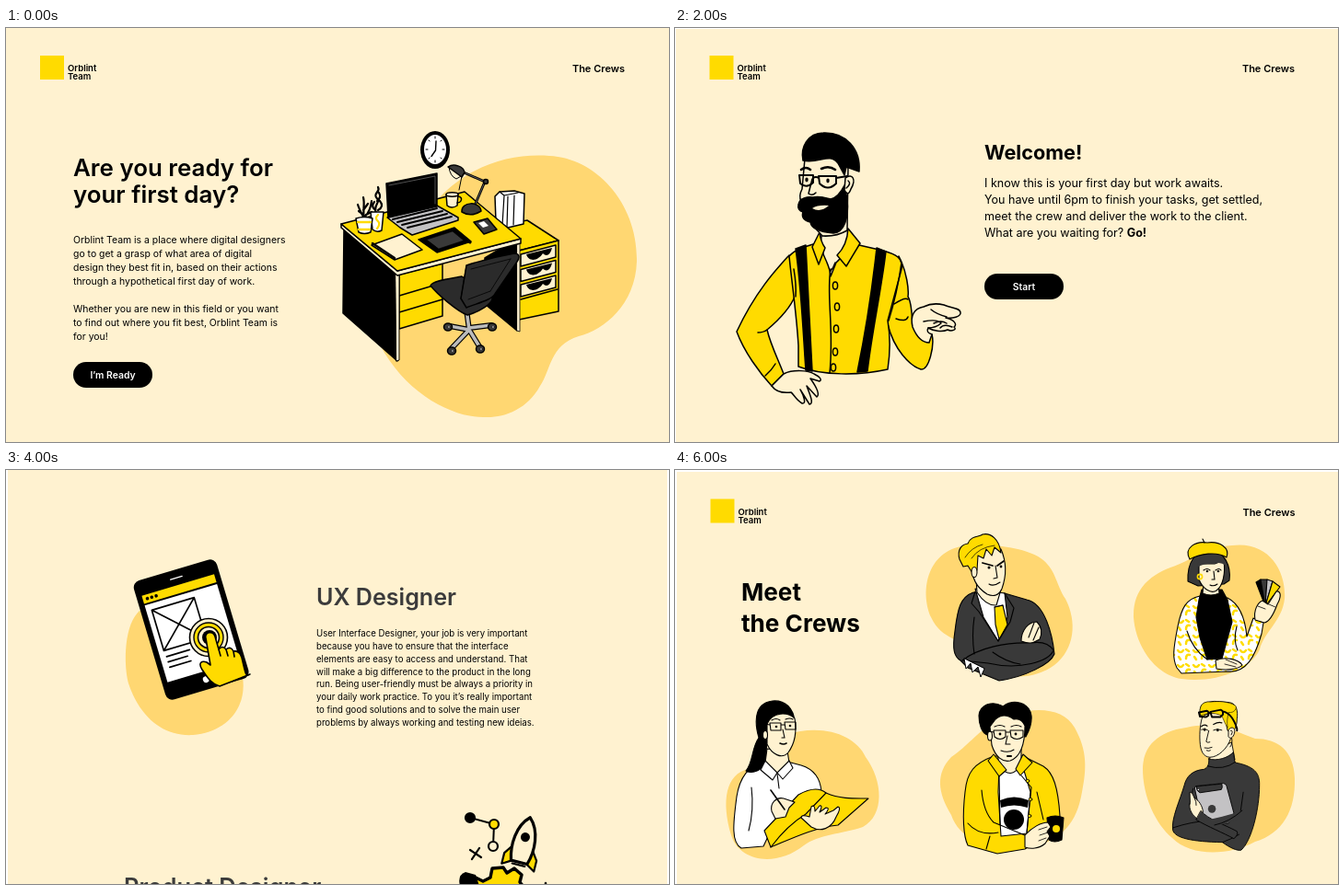
Recreate the animation shown at these times as an HTML page. Size 720 px wide and 450 px high, loop 7 s.

```html
<!DOCTYPE html>
<html lang="en">
<head>
<meta charset="utf-8">
<title>Crew quiz</title>
<style>
html, body { margin: 0; width: 100%; height: 100%; overflow: hidden; background: #fff; }
svg { display: block; width: 720px; height: 450px; }
text { font-family: Inter, "Open Sans", sans-serif; stroke: none; white-space: pre; }
.card { filter: drop-shadow(2.5px 2.5px 1.2px rgba(70, 60, 30, .45)); }
</style>
</head>
<body>
<svg id="stage" viewBox="0 0 720 450" stroke-linecap="round" stroke-linejoin="round">
<defs>
<pattern id="beans" width="17" height="16" patternUnits="userSpaceOnUse">
<rect width="17" height="16" fill="#fff"/>
<path d="M2 4q3 4 6 0M11 13q0-5 4-4M11 3l3 2M3 11l2 3" fill="none" stroke="#fd0" stroke-width="2.5"/>
</pattern>
</defs>
</svg>
<script>
const C = { y: '#ffdb00', k: '#000', w: '#fff', c: '#fff2d0', b: '#ffd772', d: '#393939',
  h: '#2b2b2b', g: '#c3c2c4', n: 'none', beans: 'url(#beans)' };

// Shape helpers: fill key, geometry, line weight (omitted = inherited)
const sw = w => w === undefined ? '' : w ? ` stroke-width="${w}"` : ' stroke="none"';
const p = (f, d, w) => `<path fill="${C[f]}" d="${d}"${sw(w)}/>`;
const l = (d, w) => p('n', d, w);
const e = (f, x, y, rx, ry, w) => `<ellipse fill="${C[f]}" cx="${x}" cy="${y}" rx="${rx}" ry="${ry}"${sw(w)}/>`;
const o = (f, x, y, r, w) => e(f, x, y, r, r, w);
const r = (f, x, y, w, h, rx, line) => `<rect fill="${C[f]}" x="${x}" y="${y}" width="${w}" height="${h}" rx="${rx}"${sw(line)}/>`;
const blob = d => p('b', d, 0);
const g = (attr, ...parts) => `<g ${attr}>${parts.join('')}</g>`;
const ink = (w, ...parts) => g(`stroke="#000" stroke-width="${w}"`, ...parts);
const tint = (color, ...parts) => g(`stroke="${color}"`, ...parts);

const text = (x, y, size, weight, str, lead = 0, anchor = 'start', color = '#000') =>
  `<text font-size="${size}" font-weight="${weight}" text-anchor="${anchor}" fill="${color}">` +
  str.split('|').map((s, i) => `<tspan x="${x}" y="${y + i * lead}">${s}</tspan>`).join('') + '</text>';

const page = (x, y, x2) => r('c', x, y, x2 - x, 450 - y, 0, 0);
const nav = (x, y, right) => r('y', x, y, 26, 26, 0, 0) +
  text(x + 30, y + 17, 9.5, 600, 'Orblint|Team', 9.3) +
  text(right, y + 18, 11, 600, 'The Crews', 0, 'end');
const button = (x, y, w, h, str, f = 'k', color = '#fff', size = 10.4) =>
  r(f, x, y, w, h, h / 2, 0) + text(x + w / 2, y + h / 2 + 3.7, size, 600, str, 0, 'middle', color);
const card = (x, y, tx, ty, str, f = 'w') =>
  g('class="card"', r(f, x, y, 158.5, 85, 23, 0)) + text(tx, ty, 9.6, 400, str, 13.6, 'middle');

const chairLegs = 'M500 306L503 328M503 328L484 348M503 328L514 346M503 328L482 324M503 326L527 323';
const desk = () => blob('M590 139C640 141 686 190 685 253C684 300 650 328 622 335C590 345 592 372 580 389C566 415 540 424 520 423C486 424 434 398 406 344C400 290 440 220 470 185C505 148 550 136 590 139Z') +
  ink(1.5,
    // clock
    e('k', 466, 132.5, 16, 20.5, 0), e('w', 466, 132, 12, 16, 0),
    l('M467 123L466.5 133L462 139.5', 1.4), l('M466 118v2M466 144v2M456 132h2M474 132h2M459 122l1 1M473 122l-1 1M459 142l1-1M473 142l-1-1', 1),
    // cabinet and papers
    p('y', 'M529 216L566 209L600 231L557 242Z'), p('y', 'M557 242L600 231V308L557 317Z'),
    [0, 16.5, 33].map(y => g(`transform="translate(0 ${y})"`, p('c', 'M559 246L597 236V249L559 259Z'),
      p('k', 'M565 246L593 239C591 247 587 249 583 245C578 253 568 255 565 246Z', 0))).join(''),
    l('M559 295L599 284'),
    p('w', 'M531 183L536 178L552 177L563 180L562 213L545 217L532 211Z'), l('M536 178L541 182L539 214M541 182L556 179M545 183L544 216M552 182L551 214', 1.2),
    // desk body
    p('k', 'M556 234L535 241L520 250V300L555 329Z'), p('c', 'M555 234L558 233V330L555 329Z', .8),
    p('y', 'M427 268L474 256V313L427 327Z'), l('M427 291L474 277M427 309L474 295'),
    p('k', 'M367 217L425 266V362L366 310Z'), p('c', 'M423 267L427 267V361L424 362Z', 1),
    p('c', 'M364 213L425 264L559 229V234L425 269L364 217Z'),
    p('y', 'M364 213L498 178L559 229L425 264Z'),
    // things on top
    p('c', 'M397 236L430 224L452 241L422 252Z'), l('M398 234l24 16', 2.4),
    p('k', 'M448 230L487 217L505 232L468 244Z'), p('d', 'M457 230L485 221L497 231L470 240Z', .6), l('M487 219l17 14', 3),
    p('d', 'M508 211L523 207L533 219L519 224Z'), p('w', 'M513 212l6-2l5 5l-6 2Z', 0),
    p('g', 'M414 206L468 193L491 206V209L441 225L428 217Z'), l('M420 208L468 196M425 211L474 199M430 214L479 202M436 217L484 205', 1.9),
    p('k', 'M413 169L468 158V194L415 206Z'), tint('#888', l('M416 171L466 161V191', .6)),
    p('c', 'M478 181L491 180L490 193Q484 197 479 193Z'), e('c', 484.5, 181, 6.5, 2.2), l('M491 183q5 1 3 5q-1 2-4 2'),
    // lamp
    l('M497 157L520 167L509 193', 2.8), tint('#888', l('M497 157L520 167L509 193', .7)),
    l('M495 161L492 176', 1), p('c', 'M481 151L496 160L489 164Q482 161 481 151Z', 1),
    p('d', 'M480 151C486 147 497 150 498 157L495 162Z'), o('d', 521, 167, 2.5), p('d', 'M495 200C494 188 515 188 516 199Q505 206 495 200Z'),
    // plants
    l('M389 207C387 198 390 192 388 184M389 207Q384 198 382 192M390 205Q396 198 397 188M388 198l5-7M387 202l-4-3M391 203l6-3M402 201C398 192 408 190 402 184C399 179 407 178 404 173M401 198q-5-4-1-9M404 198q7-4 2-10M403 188q5-4 2-9', 2.2),
    p('w', 'M396 200H410L408 220Q403 223 398 219Z'), tint(C.y, l('M404 203q-4 4 0 7q3 3-1 8', 2.2)),
    p('w', 'M380 207Q389 204 398 207L396 222Q389 225 383 222Z'), tint(C.y, l('M382 211H396M383 219H395', 2.4)),
    // chair
    l(chairLegs, 6), tint('#bbb', l(chairLegs, 3.6)),
    [[484, 351], [515, 349], [480, 325], [528, 325]].map(([x, y]) => e('d', x, y, 4.5, 4) + o('g', x + 1, y, 1.4, .6)).join(''),
    p('h', 'M461 280C463 274 486 272 495 270L528 292C530 300 512 309 501 312C490 308 468 289 461 280Z'),
    p('h', 'M500 258C515 253 535 248 552 245C558 245 558 250 555 254L531 289C527 296 512 299 500 304L494 294Z'),
    l('M505 262L548 251M502 295L526 286M500 258L494 294M548 251L526 286', .8));

const bearded = () => ink(1.5,
  p('y', 'M124 247C112 260 88 285 67 330C75 352 92 375 105 389L118 376C112 360 104 345 100 328C112 318 125 305 131 290Z'),
  p('y', 'M243 248C252 265 254 285 253 292C258 300 257 318 258 322C262 330 272 335 279 333C282 345 276 372 267 371C255 367 238 350 231 322L228 262Z'),
  p('y', 'M153 234C140 238 130 241 124 248C126 270 132 310 134 345V368C160 378 200 378 231 371C235 345 233 330 231 318L246 262C248 250 240 246 226 242L200 236L185 222Z'),
  l('M90 331Q96 331 100 328M109 365Q105 372 98 378M129 262Q132 280 131 292M246 255Q241 290 232 318M238 300Q250 292 253 295M240 316Q251 320 253 314'),
  p('k', 'M131 240L142 236C144 280 147 330 149 373L142 372C139 330 137 280 131 240Z'),
  p('k', 'M219 239L229 243C224 285 214 330 209 373L198 374C207 330 214 285 219 239Z'),
  p('c', 'M160 220L158 234C160 250 168 255 169 270L175 255C184 247 190 235 187 218Z'),
  p('y', 'M157 222L149 238L156 257L163 239Q158 232 157 222Z'), p('y', 'M188 218L201 234L186 259L176 247Q187 236 188 218Z'),
  l('M169 262C164 290 173 325 168 375'),
  [[174, 280], [176, 303], [175, 327], [174, 352], [172, 369]].map(([x, y]) => e('y', x, y, 2.6, 4)).join(''), l('M174 255q-2 6-5 9'),
  // hands
  p('c', 'M105 389L118 376C128 371 145 372 151 376C157 379 160 382 157 384L147 381C152 388 158 398 154 401L143 389C147 400 151 408 146 409L136 393C140 400 143 409 138 408C132 405 128 397 126 396C118 397 110 396 105 389Z'),
  p('c', 'M258 325C255 312 260 305 270 303C278 299 284 299 292 301C301 305 309 304 310 309C311 314 301 316 294 315C303 317 307 322 303 325C307 328 300 330 296 328C290 331 280 329 275 326Q272 331 279 333L276 342Q265 342 258 325Z'),
  l('M278 306Q284 311 295 314M270 319Q285 316 289 321Q283 326 275 326M281 321q8-4 14 0M288 326q4-5 13-1'),
  // head
  p('c', 'M141 142L138 175Q134 183 137 188L150 215L160 226Q175 227 187 220L188 150L170 136Z'),
  p('k', 'M134 192C135 185 144 183 150 184C157 182 165 185 169 186C177 184 181 177 184 171L187 186C189 206 184 222 172 223C158 222 148 218 147 211C140 209 137 206 139 200C135 199 133 196 134 192Z'),
  p('c', 'M149 196Q155 192 167 193Q158 201 149 196Z', 0), l('M149 164L145 180Q149 183 153 179'),
  p('k', 'M139 144C136 130 144 114 161 114C185 113 202 131 200 156L186 151L184 160L177 147C168 135 156 148 139 144Z'),
  p('c', 'M185 163C193 157 197 165 191 175Q188 184 184 176Z'), l('M188 166q4 3-2 8'),
  l('M137 154Q142 150 147 154M159 153Q167 149 174 154', 2.6), e('k', 143, 165, 1.7, 2.4, 0), e('k', 166, 166, 1.7, 2.4, 0),
  l('M135 160H150V168Q143 175 136 169ZM156 161H175V169Q166 178 157 169ZM150 163Q153 161 156 163M175 163L187 161', 2));

const tabletMan = () => ink(1.6,
  p('c', 'M555 212L553 235Q580 245 602 228L596 195Z'),
  p('y', 'M537 145C531 125 540 117 552 117C565 114 580 117 592 118C606 120 608 136 606 150C606 160 603 170 596 176L582 178Z'),
  p('c', 'M540 145C536 155 534 175 535 192C536 212 542 222 554 223C570 223 588 206 594 187L594 172L588 172L583 148L572 140Q555 134 540 145Z'),
  p('y', 'M536 143C532 126 540 115 555 117C570 115 590 116 603 124C607 128 601 139 590 137C588 145 586 155 588 166C582 158 580 148 576 143C562 137 550 138 536 143Z', 1),
  p('c', 'M590 170C596 162 604 167 601 177C599 185 593 189 590 184Z'), l('M594 172Q600 171 595 180M596 186Q598 197 593 203'),
  l('M533 137L548 134Q553 135 551 143L547 146L535 145ZM555 136L575 132Q580 134 579 141L574 146L558 146ZM551 139L556 137M579 135Q597 139 606 168L606 172', 3.4),
  l('M538 164Q543 159 549 163M561 160Q570 155 577 157', 2.2), l('M538 170Q544 166 550 171M561 171Q568 167 577 171M552 172L547 193Q549 196 554 194M544 205Q551 207 558 204M548 210q4 2 7 0'),
  e('k', 544, 170, 2.2, 2.8, 0), e('k', 569, 171, 2.3, 2.8, 0),
  p('d', 'M552 226C553 236 550 243 543 246C520 248 509 260 505 277C497 305 480 340 483 362C486 378 520 385 578 386C592 396 606 403 614 401C635 382 649 320 649 277C650 252 638 240 602 233L599 213C590 224 567 231 552 226Z'),
  l('M550 240Q580 249 603 232M522 283L515 315M618 290L612 333M610 371Q595 380 578 386M484 358Q520 346 550 345'),
  p('g', 'M525 282Q525 278 529 278L580 273Q585 274 586 278L600 330L590 350L540 348Z'),
  p('d', 'M528 279L577 274Q579 281 576 285L535 291Q528 288 528 279Z'), o('d', 558, 322, 7.5, 0), o('w', 532, 285, 1.2, 0),
  p('c', 'M516 290Q519 288 524 300C533 306 540 316 541 328L532 342C522 337 512 322 516 311Z'), l('M524 300Q529 309 528 315'),
  p('d', 'M537 326C552 343 580 351 606 365Q609 372 600 379C580 368 550 356 528 343Z'),
  p('d', 'M540 345C565 340 590 335 616 325L618 334C600 350 575 352 563 353Z', 0), l('M563 353Q592 347 616 325'));

const phone = () => blob('M150 150C128 160 127 210 133 232C145 268 170 290 203 288C240 285 262 258 257 225L220 140Z') +
  g('transform="translate(201 173) rotate(-16.6)"',
    r('k', -47, -67, 94, 135, 8, 0), r('y', -41, -50, 82, 9, 0, 0), r('w', -41, -39, 82, 87, 0, 0),
    [-36, -31, -26].map(x => o('k', x, -45.5, 1.8, 0)).join(''),
    ink(1.7, l('M-35-32H13V14H-35ZL13 14M13-32L-35 14M-34 21H-8M-34 27H-12M-34 33H-10')),
    tint('#fff', l('M-6-58H7', 1.4)), o('w', 0, 57, 3.5, 0)) +
  ink(1.6, o('c', 220, 182, 20.5), o('y', 220, 182, 16, 1.4), o('c', 220, 182, 11.5), o('k', 221, 182, 8, 0),
    p('y', 'M217 183C215 176 225 174 227 181L231 195Q235 190 239 195Q244 191 247 197Q254 196 256 204C260 220 260 226 265 222L232 235C222 232 218 224 213 217C208 209 213 207 218 209L222 212Z'),
    l('M231 195l2 7M239 195l2 7M247 197l1 6'));

const rocket = () => ink(2.2,
  l('M504 378L530 385L529 409', 2), o('k', 504, 378, 5), o('y', 530, 385, 5), o('c', 529, 409, 5), l('M504 413L516 421M514 411L506 423'),
  g('transform="translate(563 403) rotate(14)"', p('y', 'M-11 8L-18 18V30L-8 24ZM11 8L18 18V30L8 24Z'), p('c', 'M0-26C13-14 14 8 9 24H-9C-14 8-13-14 0-26Z', 3.2), o('k', 0, -4, 5, 0), l('M-7 27H7')),
  p('y', 'M503 452L510 443L518 447L526 443L528 433L540 432L544 438L552 433L560 440L558 448L563 454Z', 3.4),
  p('k', 'M493 452Q490 440 499 437L510 440L514 452Z', 0), l('M586 449v4', 2.5));

const chart = () => blob('M555 72C585 74 597 110 588 137C580 163 555 170 548 190C540 205 520 212 500 211C465 208 440 180 443 145C448 115 480 122 497 108C510 95 525 68 555 72Z') +
  ink(2.4, l('M538 78V165M538 107H548M528 136H538'),
    p('y', 'M490 62L548 60L547 77L492 79Z'), l('M497 71l4 4l8-9M515 70H531M538 70h5'),
    p('g', 'M547 99L597 98L597 115L548 116Z'), l('M558 104l-5 4l5 4M569 103l5 4l-5 5M566 102l-4 11M580 107H590', 2),
    p('g', 'M475 129L527 127L526 145L476 147Z'), l('M482 138l4 4l7-8M501 137H517'),
    p('c', 'M526 166L582 165L581 182L527 182Z'), o('n', 536, 174, 3.5), o('n', 547, 174, 3.5), l('M556 174h6M567 174h8'),
    r('c', 478, 87, 12.5, 13, 2), r('y', 545.5, 129, 14, 14, 1),
    l('M499 86H514M519 86H527M499 94H527M499 102H508M513 102H525M569 129H577M582 129H598M569 136H597M569 144H585M590 144H597', 2));

const suitMan = () => blob('M318 82C345 80 385 85 400 98C414 110 414 125 424 140C437 165 434 195 412 212C385 232 345 228 325 200C312 182 290 186 278 160C265 130 275 85 318 82Z') +
  p('d', 'M324 133C310 138 307 150 304 175C301 195 303 203 310 207L318 215L352 229C380 225 408 211 412 200C410 180 402 145 382 141L358 134Z') +
  p('w', 'M326 129L335 160L351 186L361 160L358 134Z') + p('c', 'M327 118L328 133Q338 148 349 147L354 130Z') +
  p('y', 'M347 149L356 147L361 168L352 184L348 168Z') + l('M326 132L322 145L330 154L351 186L364 165L368 150L358 134M347 149L356 147') +
  p('c', 'M322 98C321 118 328 128 339 135Q350 140 355 129C360 115 360 100 354 86L335 84Z') +
  p('y', 'M309 97C306 87 311 81 318 80C321 71 331 73 334 70C343 68 352 75 354 90L347 84L344 93L338 86L335 96L329 93L328 109L323 112L318 104L313 105Z') +
  l('M315 95Q322 84 334 81M322 96Q330 84 347 82', .7) + e('c', 325, 111, 3, 5.5) +
  l('M334 101L345 104M350 104L357 99', 1.8) + l('M348 104L350 117L346 118M341 124Q346 127 353 122') + o('k', 341, 106, 1.5, 0) + o('k', 354, 105, 1.4, 0) +
  p('c', 'M376 186C376 174 384 165 393 165C398 170 399 177 396 184L386 189Z') + l('M390 166L384 182M395 171L389 185') +
  p('d', 'M312 207C330 193 360 187 386 188Q404 185 411 196C406 208 375 218 340 210Z') + l('M325 160Q322 180 325 200M345 198Q360 209 375 211') +
  p('w', 'M314 205l2 11l5-6l2 10l6-6l3 11l4-9Z', 1);

const beretWoman = () => blob('M605 82C645 77 664 110 662 140C659 165 640 175 635 195C625 218 585 232 550 227C520 222 500 190 498 160C497 130 515 115 538 106C562 98 575 84 605 82Z') +
  p('beans', 'M570 137C555 140 550 150 546 170C541 195 540 205 545 215L550 221L600 219C620 221 630 203 637 178L639 166L628 161L621 181C619 160 612 145 600 139Z') +
  p('k', 'M572 130L569 141L566 160L570 182L578 206L594 205L605 165L600 141L594 130Z') + l('M610 170Q606 185 611 196M556 175Q562 195 578 206') +
  p('d', 'M557 121C556 100 565 88 580 87C597 87 604 105 602 120L596 124L568 126Z') +
  p('c', 'M574 122L573 134Q582 138 591 134L590 122Z') +
  p('c', 'M569 102L569 119C573 129 582 135 588 131C595 126 598 113 596 98L586 102Z') + p('d', 'M567 106Q568 90 585 91Q598 93 598 104Q592 99 586 102Q575 101 567 106Z', 0) +
  p('y', 'M559 97C552 84 566 77 578 79C592 77 603 85 599 95C588 88 570 91 559 97Z') + l('M575 79l-2-4') +
  l('M574 109q4-3 7 0M587 109q4-3 6 0M585 110l1 9h-3M581 125q4 2 8-1') + o('k', 578, 110, 1.3, 0) + o('k', 590, 110, 1.3, 0) +
  tint(C.y, o('n', 570, 116, 2.6, 1.6)) +
  p('c', 'M587 207C598 202 612 206 616 212C612 217 598 218 588 216Z') + l('M598 206l12 5M597 211l12 3', .8) +
  p('k', 'M641 148L631 122L636 119Z') + p('d', 'M641 148L636 119L643 119Z') + p('g', 'M641 148L643 119L649 121Z') + p('y', 'M641 148L649 121L657 127Z') +
  p('c', 'M630 163C628 152 633 144 638 142L644 146L653 132C659 131 658 139 654 146C650 157 645 165 640 166Z') + l('M633 148l8 3M645 146l7 3', .8);

const folderWoman = () => blob('M120 288C160 275 196 288 207 312C226 338 228 375 204 388C180 396 156 396 140 408C110 432 70 426 61 397C50 360 55 330 80 325C100 318 100 296 120 288Z') +
  p('w', 'M98 317C80 320 70 335 67 355C63 385 61 405 72 411L96 409L104 392L150 372L159 350C158 335 150 325 137 321L122 317Z') +
  p('k', 'M91 291C85 270 88 253 106 251C120 250 129 259 130 274L101 277L100 296L98 316C97 326 84 331 77 327C85 318 83 302 91 291Z') +
  p('c', 'M100 303L98 318L111 330L124 318L122 305Z') +
  p('c', 'M100 276L100 298C105 309 116 315 123 307C131 296 132 282 130 270C123 263 106 262 100 276Z') + e('c', 98, 288, 2.5, 4.5) +
  p('w', 'M98 316L93 326L106 337L111 329Z') + p('w', 'M124 316L128 324L117 336L111 329Z') +
  l('M111 330L113 346M83 345Q86 370 80 392M103 275H115V283H104ZM119 274H131V282H120ZM115 277h4M103 277L97 276M117 282l2 9h-3M105 272q5-3 9 0M120 271q5-2 8 0') +
  o('k', 110, 279, 1.3, 0) + o('k', 125, 278, 1.3, 0) + l('M114 297q4 2 7 0', 1.6) +
  p('y', 'M97 392L134 353C148 345 158 346 164 351C180 358 195 357 210 357L177 386C150 389 128 400 104 410Z') +
  l('M104 410Q122 386 142 374L164 351') +
  p('c', 'M105 371C103 362 110 355 118 357L130 361L124 367L120 377L109 379Z') + l('M104 348L119 369', 1.6) +
  p('c', 'M137 378Q137 374 146 377L148 366Q152 363 152 371L157 365Q161 364 157 372L164 367Q169 367 163 374L172 370L177 366Q181 367 175 377C170 390 158 394 148 388Z');

const mugMan = () => blob('M345 275C380 256 420 255 434 280C448 305 447 325 442 350C436 385 420 400 390 410C350 418 310 405 300 375C285 350 283 330 300 312C320 298 325 288 345 275Z') +
  p('y', 'M346 311C325 319 317 328 315 350C312 375 313 398 318 408L350 417L380 412L392 404L405 388L418 376C416 345 411 329 400 322L378 311Z') +
  p('w', 'M352 322L351 350L354 398L382 395L386 350L377 320Z') + p('c', 'M350 306L352 322Q365 338 376 320L376 302Z') +
  p('k', 'M353 359Q368 352 384 359L383 367Q368 362 354 367Z', 0) + o('k', 368, 380, 11, 0) +
  p('y', 'M346 309L340 316L352 333L360 326Z') + p('y', 'M378 309L388 318L375 332L370 325Z') +
  l('M333 348Q335 372 346 383M346 383L380 397M352 333L353 385M376 332L387 345L382 394M393 350L400 380M318 384Q330 398 351 394M342 398l-4 14') +
  [[383, 338], [386, 358], [385, 376]].map(([x, y]) => o('y', x, y, 1.8, .8)).join('') +
  p('k', 'M339 288C333 286 330 276 330 267C331 255 345 250 356 257C368 248 385 253 387 267C388 278 383 286 381 290Z') +
  p('c', 'M342 279L344 299C348 312 356 318 364 316C375 312 380 298 380 278Q376 269 368 271Q357 263 348 271Z') + e('c', 342, 289, 2.5, 5) +
  l('M346 283H359V290Q353 295 347 290ZM364 283H378V290Q371 295 365 290ZM359 285h5M346 285l-5-1M361 289l-2 9h5M354 305q8 3 14-1M347 279q6-3 11 0M365 279q6-3 11 0') +
  o('k', 353, 287, 1.4, 0) + o('k', 370, 287, 1.4, 0) + l('M361 311h4', 2) +
  p('k', 'M404 378Q413 374 422 378L420 402Q412 406 406 402Z') + o('y', 414, 390, 4, 0) +
  p('c', 'M380 397C388 388 398 383 405 383L408 388L404 393L407 398L402 406C395 412 386 412 380 410Z') + l('M395 391l9-3M396 397l9-3M395 403l8-3', .8);

const crew = () =>
  ink(1.1, ...[suitMan, beretWoman, folderWoman, mugMan].map(draw => g('', draw()))).replaceAll('" d="M', '" d="M') +
  blob('M555 280C590 272 610 285 630 292C655 292 672 305 673 335C674 370 660 395 630 404C600 420 560 420 540 400C522 385 508 355 508 325C508 300 525 284 555 280Z') +
  g('transform="translate(266.7 185.8) scale(.567)"', tabletMan());

const GREY = '#3b3b3b';
const numbers = [2, 3, 4, 5, 6, 7, 8].map(n => text(227.2 + n * 24.5, 401.5, 10, 600, String(n), 0, 'middle', '#9d9473')).join('');

const scenes = [
  page(0, 0, 720) + nav(37, 30, 672) + desk() +
    text(73, 161, 25.9, 600, 'Are you ready for|your first day?', 29) +
    text(73, 234, 10.45, 400, 'Orblint Team is a place where digital designers|go to get a grasp of what area of digital|design they best fit in, based on their actions|through a hypothetical first day of work.||Whether you are new in this field or you want|to find out where you fit best, Orblint Team is|for you!', 15.05) +
    button(73, 363, 86, 28, 'I’m Ready'),

  page(1, 1, 720) + nav(37.5, 30, 673) +
    p('k', 'M93 126H111V179H100.5V136H93Z', 0) +
    text(125, 135, 12.3, 600, 'The desk is empty,|to settle in you…', 18) +
    card(281.5, 114.5, 360.8, 146, 'My computer is my|desk, I don’t need|anything else') +
    card(472.5, 114.5, 554.5, 144.5, 'Organize your|gadgets in order|to optimize workflow') +
    card(90.5, 224.5, 169.5, 254.5, 'Display your leadership|books. Fog of Tin is one|of my favorites') +
    card(281.5, 223.5, 363.5, 254, 'Papers, maps, graphics…|Too much information,|too little space!') +
    card(472.5, 223.5, 551.5, 254, 'Posters, stickers, colour|charts. They get me|inspired and motivated', 'y') +
    text(70.5, 401.5, 11, 600, 'Previous', 0, 'start', '#9d9473') +
    p('k', 'M236 398C236 388 242 384 247 384C254 381 259 387 260 390C265 391 267 397 264 402C263 408 258 414 250 414C241 415 236 407 236 398Z', 0) +
    text(250, 401.5, 10, 700, '1', 0, 'middle', '#fff') + numbers,

  page(1, 1, 720) + nav(37.5, 30, 673) + bearded() +
    text(336, 143, 21.7, 700, 'Welcome!') +
    text(336, 173, 12.55, 400, 'I know this is your first day but work awaits.|You have until 6pm to finish your tasks, get settled,|meet the crew and deliver the work to the client.|What are you waiting for? <tspan font-weight="700">Go!</tspan>', 18) +
    button(336, 267, 86, 28, 'Start'),

  page(2, 1, 718) + blob('M718 78C680 62 638 70 613 105C600 130 585 160 545 182C500 192 462 235 460 285C459 320 468 350 478 372C505 410 550 416 590 425C640 432 680 425 718 413Z') +
    nav(39, 31, 689.5) + tabletMan() +
    text(77, 145, 19.3, 600, 'You’re an', 0, 'start', GREY) +
    text(77, 181, 27.3, 600, 'INTERACTION MANIAC!') +
    text(77, 240, 8.85, 400, 'You got sorted the interaction design team! This means that you are|encharged of the development of digital and non-digital products and|services. Your job is very important because you have to ensure that the|interface elements are easy to access and understand. The user’s needs|are priority to you, by having a close relationship with them you will be|able to test new ideas and change people’s experiences.|You are dedicated, proactive and a hard worker.|<tspan font-weight="700">We are welcome to have you!</tspan>', 12.3) +
    text(360, 378, 8.55, 600, 'Learn more about|your crew', 10, 'middle') +
    ink(1.2, l('M360 398V405.5M356.5 402L360 405.5L363.5 402')),

  page(2, 0, 718) + phone() + rocket() +
    text(337, 147, 25.1, 600, 'UX Designer', 0, 'start', GREY) +
    text(337, 181, 9.63, 400, 'User Interface Designer, your job is very important|because you have to ensure that the interface|elements are easy to access and understand. That|will make a big difference to the product in the long|run. Being user-friendly must be always a priority in|your daily work practice. To you it’s really important|to find good solutions and to solve the main user|problems by always working and testing new ideias.', 13.85) +
    text(128, 462, 25.5, 600, 'Product Designer', 0, 'start', GREY),

  page(2, 0, 718) + chart() +
    text(128, 65, 26, 600, 'Information Architect', 0, 'start', GREY) +
    text(128.5, 100, 9.63, 400, 'Information Architect is the job that tries to|identify and organize information in a product|in a meaningful way. Essentially it focuses|on the organization and structure of the content,|helping users find information, create hierarchy|and categorize information. By structuring|and labeling the content in an effective and|sustainable way you can help the user achieve|their goals and complete tasks.', 13.85) +
    button(128, 377, 148, 28.5, 'See all the crews') +
    button(441, 377, 148.5, 28.5, 'Take the quiz again', 'y', '#000', 10.6),

  page(2, 2, 720) + nav(38.5, 31.5, 673.5) + crew() +
    text(72, 142, 26.1, 700, 'Meet|the Crews', 34)
];

const stage = document.getElementById('stage');
stage.insertAdjacentHTML('beforeend', scenes.map(s => g('class="scene" display="none"', s)).join(''));
const layers = [...stage.querySelectorAll('.scene')];

function show(time) {
  const now = Math.floor(time / 1000) % layers.length;
  layers.forEach((el, i) => el.setAttribute('display', i === now ? 'inline' : 'none'));
}
function tick() {
  show(performance.now());
  requestAnimationFrame(tick);
}
tick();
</script>
</body>
</html>
```
